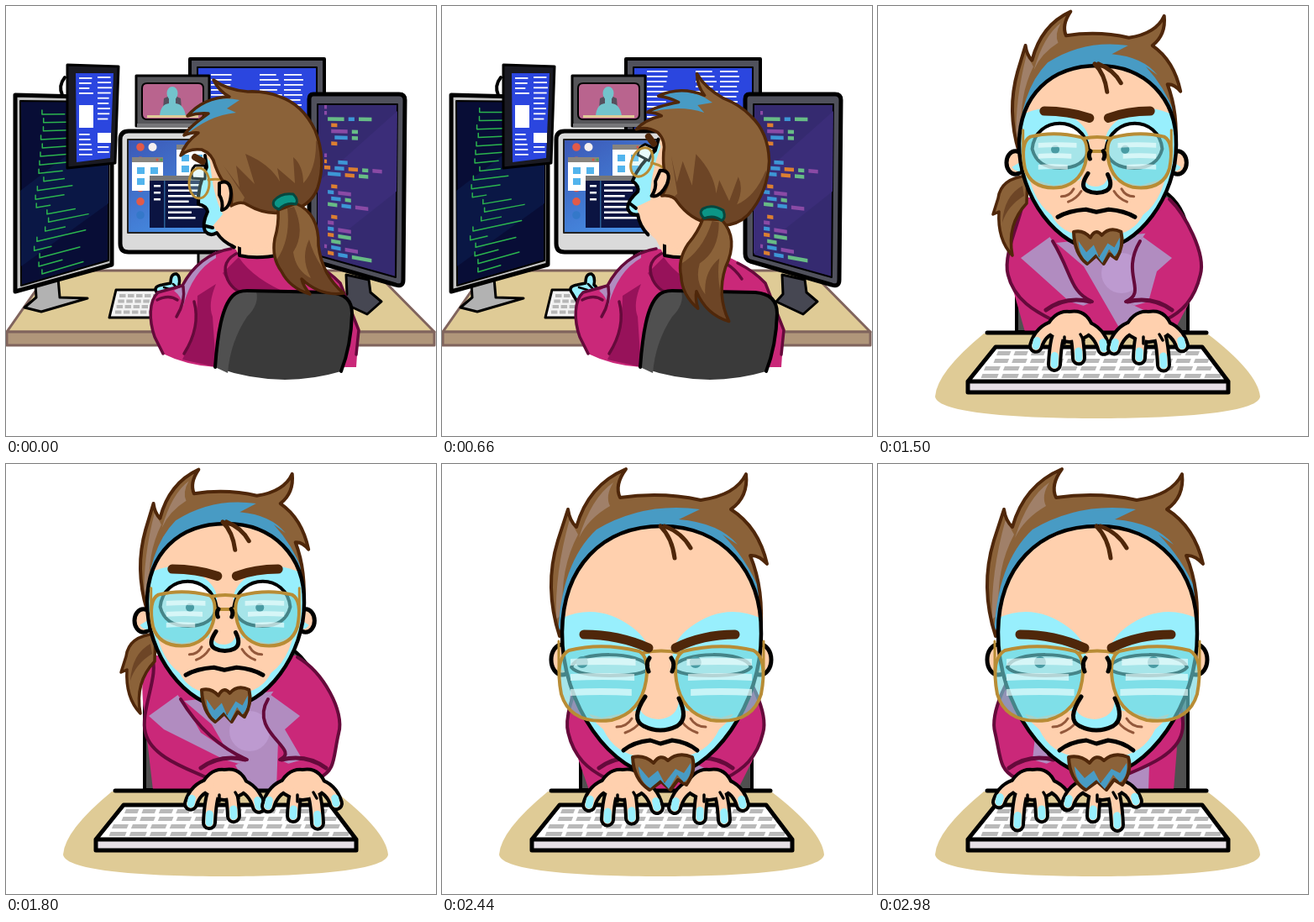
These frames come from a looping animation (512 by 512 pixels, 3 s). An HTML page with a canvas:

```html
<!DOCTYPE html>
<html lang="en">
<head>
<meta charset="utf-8">
<title>At the desk</title>
<style>
html, body { margin: 0; width: 100%; height: 100%; overflow: hidden; background: #fff; }
canvas { display: block; width: 100vw; height: 100vh; }
</style>
</head>
<body>
<canvas id="stage" width="512" height="512"></canvas>
<script>
const LOOP = 3000, CUT = 1500;
const ctx = document.getElementById('stage').getContext('2d');
ctx.lineJoin = ctx.lineCap = 'round';

const C = {
  ink: '#000', skin: '#ffd0ae', glow: '#98effd', hair: '#8b6239', hairDark: '#6d4526',
  hairLine: '#4f270a', blue: '#489bc4', pink: '#ca2879', pinkDark: '#97125a',
  pinkLine: '#650a3b', lilac: '#b18cc0', chair: '#3a3a3a', chairLit: '#505050',
  gold: '#b88c35', desk: '#dfcb96', silver: '#c4c4c4', steel: '#50515c', doc: '#2b46df'
};

// ---- helpers ----
let M = new DOMMatrix();
function shape(d) {
  const p = new Path2D();
  p.addPath(new Path2D(d), M);
  return p;
}
function put(d, fill, line, w = 4) {
  const p = shape(d);
  if (fill) { ctx.fillStyle = fill; ctx.fill(p); }
  if (line) { ctx.strokeStyle = line; ctx.lineWidth = w; ctx.stroke(p); }
}
function within(m, draw) {
  const old = M;
  M = old.multiply(m);
  draw();
  M = old;
}
function clip(d, draw) {
  ctx.save();
  ctx.clip(shape(d));
  draw();
  ctx.restore();
}
const shift = (x, y = 0) => new DOMMatrix([1, 0, 0, 1, x, y]);
const FLIP = new DOMMatrix([-1, 0, 0, 1, 522, 0]);
function both(draw) { draw(); within(FLIP, draw); }
const box = (x, y, w, h) => `M${x},${y}h${w}v${h}h${-w}z`;
const oval = (x, y, a, b = a) => `M${x - a},${y}a${a},${b} 0 1 0 ${2 * a},0a${a},${b} 0 1 0 ${-2 * a},0z`;
const mod = (a, n) => ((a % n) + n) % n;
const rnd = n => mod(Math.sin(n * 127.1 + 11.7) * 43758.5453, 1);

function track(t, keys) {
  if (t <= keys[0][0]) return keys[0][1];
  for (let i = 1; i < keys.length; i++) {
    const [a, u] = keys[i - 1], [b, v] = keys[i];
    if (t < b) {
      const p = (t - a) / (b - a);
      return u + (v - u) * p * p * (3 - 2 * p);
    }
  }
  return keys[keys.length - 1][1];
}

// ---- first scene: the workplace ----
const CODE = [
  'p', ' ggggg bb gggg', '  oo', '  ppppp gg', '   bbbb gg', '  oo', '', 'p', 'o   bbb',
  'oo bbb ooo gg ppp', ' bbbb ooo ggg', '', '  oo', ' bb pppp', '  bbb gg', ' ggg bbb pppp',
  '', '  oo', ' pp', ' bb pppp', ' oo gggg', '  ggg', 'p bbb pppp', ' oo bbb gggggg', '', 'p'
];
const INK = { p: '#8a4aa5', g: '#67bb86', b: '#3d96d6', o: '#dc7f31' };

function greenCode(t) {
  for (let i = 0; i < 20; i++) {
    const y = 122 + mod(i * 10.2 - t * .019 + 7, 204);
    const slope = -.27 * (y - 125) / 180;
    const x = 28 + 18 * rnd(Math.floor(i / 3)) + 8 * rnd(i + 40);
    const w = 12 + 48 * rnd(i + 9);
    const top = y + slope * (x - 30);
    put(`M${x},${top}v-5M${x},${top}l${w},${slope * w}`, null, '#2bb44e', 1.5);
  }
}

function colourCode(t) {
  const up = Math.max(0, t - 660) * 9 / 480;
  CODE.forEach((row, i) => {
    const y = 120 + mod(i * 7.2 + 7 - up, 187);
    const slope = .2 * (y - 125) / 180;
    for (const run of row.matchAll(/(\w)\1*/g)) {
      const x = 379 + run.index * 4.1, w = run[0].length * 4.1 - 1;
      const top = y - 2 + slope * (x - 379);
      put(`M${x},${top}l${w},${slope * w}v4.5l${-w},${-slope * w}z`, INK[run[1]]);
    }
  });
}

function textColumn(x, y, n, w, step, seed) {
  for (let i = 0; i < n; i++) {
    put(box(x, y + i * step, w * (.7 + .3 * rnd(seed + i)), 1.8), '#fff');
  }
}

function monitors(t) {
  // wide screen at the back
  put('M219,63H379V170H219z', C.steel, C.ink, 4);
  put(box(228, 73, 142, 90), C.doc, C.ink, 2);
  clip(box(229, 74, 140, 90), () => {
    const y = 81 - mod(t * .006, 6);
    [244, 302, 331].forEach((x, c) => textColumn(x, y, 14, 27, 6, c * 20));
  });
  // video call
  put(box(155, 83, 87, 60), '#56565a', C.ink, 3);
  put('M168,92H229Q235,92 235,98V129Q235,135 229,135H168Q162,135 162,129V98Q162,92 168,92z', '#b9648e', C.ink, 2);
  put('M187,122L188,110Q198,104 208,110L209,122z', '#55505e');
  put('M183,131Q184,117 194,116L194,108H202V116Q212,117 214,131z', '#73c3cc');
  put(oval(198, 104, 6.5, 8), '#73c3cc');
  put(box(168, 130, 61, 3), C.desk);
  put(box(156, 140, 86, 4), '#77777a');

  // left terminal
  put('M35,331L62,324L64,347L97,348L42,364L22,359L36,347z', '#b2b2b2', C.ink, 3);
  put('M11,106L126,109V308L11,340z', C.silver, C.ink, 5);
  const term = 'M17,113L122,114V303L18,333z';
  put(term, '#080d36', C.ink, 2);
  clip(term, () => {
    put('M17,220L122,140V235L18,310z', '#0a1745');
    greenCode(t);
  });
  // upright document
  put('M70,85Q62,95 67,106', null, C.ink, 4);
  put('M73,70L134,72L130,187L73,193z', '#1a1a22', C.ink, 3);
  put('M83,80L128,80L124,181L84,186z', C.doc);
  textColumn(87, 85, 4, 17, 6, 1);
  textColumn(109, 84, 9, 17, 6.2, 12);
  put(box(87, 118, 17, 27) + box(109, 151, 16, 12), '#fff');
  textColumn(87, 152, 5, 17, 6, 30);
  textColumn(109, 167, 2, 16, 6, 37);

  // main computer
  put('M229,290H262V311H229z', '#bbb', C.ink, 3);
  put('M146,149H270V293H146Q136,293 136,283V159Q136,149 146,149z', '#dadada', C.ink, 5);
  const sky = ctx.createLinearGradient(145, 160, 210, 270);
  sky.addColorStop(0, '#3c58b6');
  sky.addColorStop(1, '#468ee3');
  put(box(145, 159, 125, 111), sky, '#222', 2);
  for (let i = 0; i < 6; i++) put(oval(160, 168 + i * 16.2, 4.8), i % 3 == 2 ? '#3478c9' : '#e25a48');
  put(oval(174.5, 168, 5), '#f5efef');
  for (const [x, y] of [[150, 180], [203, 165]]) {
    put(box(x, y, 37, 40), '#fff');
    put(box(x, y, 37, 6), '#87847f');
    put(oval(x + 30, y + 3, 1.5), '#dd5340');
    put(oval(x + 35, y + 3, 1.5), '#4aa350');
    for (let i = 0; i < 4; i++) put(box(x + 6 + i % 2 * 16, y + 12 + (i >> 1) * 13, 9, 8), '#52b4ed');
  }
  put(box(171, 202, 74, 62), '#0b1442');
  put(box(171, 202, 74, 6), '#777');
  put(box(188, 208, 1.5, 56), '#2b5f95');
  for (let i = 0; i < 7; i++) {
    put(box(193, 212 + i * 6.5, 23 + 20 * rnd(i + Math.floor(t / 400)), 2.5), '#fff');
    if (i < 3) put(box(176, 213 + i * 8, 8, 2.5), '#fff');
  }

  // right editor
  put('M405,320L432,326L434,341L447,352L430,367L398,352L406,343z', '#464752', C.ink, 3);
  put('M366,105H468Q475,105 475,112L473,326Q473,335 464,332L367,304Q361,302 361,295V111Q361,105 366,105z', C.steel, C.ink, 5);
  const edit = 'M371,117H466L464,323L371,297z';
  put(edit, '#352a70', C.ink, 2);
  clip(edit, () => {
    put('M371,210L466,125V220L371,295z', '#3b2d79');
    colourCode(t);
  });
}

function office() {
  put('M52,315H438L510,388H1z', C.desk, '#80645d', 3);
  put('M1,388H510V404H1z', '#b0967a', '#80645d', 3);
}

function deskKeys() {
  put('M131,338H205L200,371H123z', '#f3f3f3', C.ink, 3);
  for (let r = 0; r < 4; r++) for (let c = 0; c < 6; c++) {
    put(box(135 - r * 1.7 + c * 10, 343 + r * 6.5, 7.5, 4), '#b7b7b7');
  }
}

function backBody(t) {
  const reach = track(t, [[0, 0], [600, -12], [1140, -12], [1500, -2]]) + 2 * Math.sin(t / 70);
  within(shift(reach), () => {
    put('M180,342Q174,334 186,332L196,330Q196,318 203,319Q208,322 206,332Q214,338 205,348L186,352z', C.glow, C.ink, 3.5);
    put('M188,335L198,338M199,331L204,336', null, C.ink, 2.5);
  });
  put('M268,289C242,293 222,310 210,333L181,341C170,351 170,374 177,394L187,414Q215,428 250,430H417L420,386L398,330C374,307 350,291 322,296z', C.pink);
  put('M228,345Q228,385 210,421L250,430L246,370Q240,355 250,331z', C.pinkDark);
  put('M250,292Q222,308 211,333L200,339Q209,346 211,357Q222,316 250,300z', C.lilac);
  put('M258,318Q270,340 295,344H340Q295,326 277,299z', C.pinkDark);
  put('M268,289C242,293 222,310 210,333L181,341C170,351 170,374 177,394L187,414M278,293Q254,303 264,326Q272,342 290,343M324,297Q355,302 370,325M211,334Q214,352 203,370M224,352Q232,382 212,414M180,350Q194,343 204,350M417,415L420,386L398,330Q385,316 365,306', null, C.pinkLine, 3.5);
  put('M256,255H326V296Q300,303 278,298z', C.skin);
  put('M278,266V297Q300,302 326,296', null, C.ink, 4);
  // chair
  put('M249,430C252,390 257,358 270,345Q276,339 287,339L386,341Q412,343 412,366Q411,404 399,435Q325,457 249,430z', C.chair);
  put('M249,430C252,390 257,358 270,345Q276,339 298,340Q302,355 287,370Q267,400 264,437z', C.chairLit);
  put('M249,430C252,390 257,358 270,345Q276,339 287,339L386,341Q412,343 412,366Q411,404 399,435', null, C.ink, 4);
}

function backHead() {
  const face = 'M237,164L239,190Q228,215 229,236Q239,238 240,245Q233,260 237,268Q243,275 251,270Q262,284 290,290L326,286L334,220L300,165z';
  put(face, C.skin);
  clip(face, () => put('M220,160L243,185Q246,225 258,248L246,262L257,276L225,285z', C.glow));
  put('M237,178L239,192Q228,215 229,236Q239,238 240,245Q233,260 237,268Q243,275 251,270Q258,281 272,287M238,262L246,264', null, C.ink, 4);
  put('M225,190Q219,196 222,205L237,206V190z', '#fff', C.ink, 3);
  put('M225,180L234,185', null, C.hairLine, 8);
  put(oval(230, 211, 12, 18), 'rgba(180,240,240,.3)', C.gold, 3);
  put('M241,207Q255,204 278,212', null, C.gold, 3);
  // hair
  const hair = 'M208,178Q218,169 233,171Q246,176 249,190Q254,203 258,208Q272,211 268,238Q280,231 288,237Q310,250 334,245Q362,240 371,217Q382,183 368,148Q353,117 326,108Q309,101 288,102Q263,100 247,88Q253,101 266,108Q235,109 216,131Q228,127 241,128Q218,144 212,154Q222,150 229,151Q213,163 208,178z';
  put(hair, C.hair);
  clip(hair, () => {
    put('M259,190L278,216L274,190L296,212L285,176Q314,188 326,209L323,193L344,211L342,180Q354,190 354,211Q370,194 369,160L390,190V250H274L284,228z', C.hairDark);
    put('M214,132Q243,104 278,112L263,122L274,127Q241,130 210,157L229,136z', C.blue);
  });
  put(hair, null, C.hairLine, 3.5);
  put('M254,211Q267,205 268,223Q267,241 257,243Q259,233 254,225z', C.skin, C.ink, 4);
  // ponytail
  const tail = 'M324,243Q325,261 320,277Q316,300 328,316Q338,336 362,343Q354,334 352,325Q374,346 402,342Q376,320 372,285Q373,247 345,235z';
  put(tail, C.hair);
  clip(tail, () => put('M343,239Q357,270 342,293Q345,315 363,324Q350,300 361,278Q369,309 402,342L352,348L315,311Q340,285 335,241z', C.hairDark));
  put(tail, null, C.hairLine, 3.5);
  put('M319,232Q327,222 342,224Q349,231 345,236Q334,233 325,242Q316,239 319,232z', '#0c9686', '#06483f', 3);
}

function workplace(t) {
  office();
  monitors(t);
  deskKeys();
  const dx = track(t, [[0, 0], [600, -13], [1140, -13], [1500, -4]]);
  within(shift(dx), () => backBody(t));
  const x = track(t, [[0, 260], [700, 260], [1100, 251], [1500, 256]]);
  const y = track(t, [[0, 224], [520, 210], [760, 210], [1080, 224]]);
  const turn = track(t, [[0, 0], [580, 24], [760, 24], [1100, -5], [1500, 0]]);
  within(shift(x, y).rotate(turn).translate(-260, -224), backHead);
}

// ---- second scene: close-up ----
// maps box b to the blend of boxes a and b
function fit(a, b, k) {
  const c = a.map((v, i) => v + (b[i] - v) * k);
  const sx = (c[2] - c[0]) / (b[2] - b[0]), sy = (c[3] - c[1]) / (b[3] - b[1]);
  return new DOMMatrix([sx, 0, 0, sy, c[0] - b[0] * sx, c[1] - b[1] * sy]);
}

function keyboard() {
  put('M126,390Q70,436 68,465C70,485 170,491 260,491C350,491 453,485 455,465Q452,436 392,390z', C.desk);
  put('M140,406H386L417,447H107z', '#fff');
  for (let r = 0; r < 4; r++) {
    const left = 141 - r * 7.5, w = (386 + r * 7.5 - left) / 12;
    for (let c = 0; c < 12; c++) {
      const x = left + c * w + (r % 2) * 4;
      put(`M${x + 2},${411 + r * 9}h${w - 5}l-2,5h${5 - w}z`, '#b9b9b9');
    }
  }
  put('M107,447H417V460H107z', '#e7e0e7');
  put('M140,406H386L417,447V460H107V447zM107,447H417', null, C.ink, 5);
}

function torso(lx, rx) {
  const le = lx * .35 + 73, re = rx * .4 + 257;
  put('M165,388V290Q170,208 260,204Q360,200 369,270V388z', C.chairLit, C.ink, 4);
  put(`M175,228C155,238 ${le},290 ${le + 3},320L175,388H352L${re - 8},340Q${re - 10},250 345,228z`, C.pink);
  put('M212,282L245,310L290,388H322L326,270z', C.lilac);
  put(oval(290, 318, 24), '#bd9ad0');
  const arm = (e, h, s) => {
    const outer = `M${260 - s * 87},230C${e + s * 20},248 ${e - s * 5},295 ${e + s * 2},320C${e + s * 9},350 ${h - s * 40},364 ${h - s * 20},374`;
    const inner = `L${h + s * 27},352C${h},340 ${260 - s * 28},320 ${260 - s * 52},280`;
    put(`${outer}${inner}z`, C.pink);
    clip(`${outer}${inner}z`, () =>
      put(`M${260 - s * 54},274L${260 - s * 90},300L${260 - s * 72},316L${h},352L${h + s * 35},362L${260 - s * 28},320z`, C.lilac));
    put(`${outer}M${h + s * 27},352${inner}`, null, C.pinkLine, 4);
    put(`M${h - s * 28},362Q${h - s * 5},345 ${h + s * 25},352`, null, C.pinkLine, 5);
  };
  arm(le, lx, 1);
  arm(re, rx, -1);
}

function hand(x, t, s) {
  const digits = [[-40, 17, -18, 382], [-18, 42, -12, 390], [11, 40, 7, 390], [41, 20, 18, 382]].map(([a, b, c, y], i) => ({
    x: x + s * a, y: 384 + b + 5 * Math.sin(t / 48 + i * 2.1 + s), rx: x + s * c, ry: y
  }));
  const at = (p, u, v) => `${p.rx + (p.x - p.rx) * u},${p.ry + (p.y - p.ry) * v}`;
  const line = (p, c, w) => put(`M${at(p, 0, 0)}Q${at(p, .75, .2)} ${at(p, 1, 1)}`, null, c, w);
  const palm = `M${x - 27},386Q${x - 17},364 ${x},366Q${x + 20},362 ${x + 27},386Q${x},410 ${x - 27},386z`;
  put(palm, C.skin, C.ink, 8);
  digits.forEach(p => line(p, C.ink, 18));
  put(palm, C.skin);
  digits.forEach(p => line(p, C.skin, 10));
  digits.forEach(p => put(`M${at(p, 1, 1)}L${at(p, .94, .72)}`, null, C.glow, 9));
  put(`M${x - 6},394v8M${x + 13},391l4,7`, null, C.ink, 3.5);
}

const HAIR = 'M140,205C128,168 126,130 138,91L150,54Q152,68 160,75Q174,25 219,6Q205,25 212,40Q262,33 308,43Q350,37 362,12Q365,39 344,54Q377,75 387,119Q377,108 367,109Q384,150 379,204Q350,120 262,115Q165,120 140,205z';
const FACE = 'M143,200C144,123 190,74 262,74C333,74 381,126 380,202C381,285 322,370 262,372C202,370 142,286 143,200z';

function eyes(t, lift, k) {
  const top = 222 - lift * 1.5, low = 252 + lift * .9;
  both(() => put(`M154,242C160,${top} 238,${top} 247,243Q240,${low} 200,${low}Q162,${low} 154,242z`, '#fff', C.ink, 4));
  const px = track(t, [[1500, 192], [1800, 203], [2120, 221], [2180, 221], [2400, 165], [2500, 170], [2980, 193]]);
  const py = 243 - 7 * k - lift * k * .2, gap = 115 + 20 * k;
  put(oval(px, py, 7) + oval(px + gap, py, 7), '#0a3c46');
  const beat = Math.floor(t / 130), wide = t > 2300;
  both(() => {
    const lens = 'M151,222Q190,212 235,223Q247,230 243,258Q237,296 202,305Q153,311 142,274Q134,231 151,222z';
    put(lens, 'rgba(112,214,220,.62)');
    clip(lens, () => {
      for (let i = 0; i < 3; i++) {
        const w = wide ? 72 + 9 * rnd(beat + i) : 50 - i * 8 + 18 * rnd(beat + i);
        put(`M${wide ? 153 : 164},${232 + i * 18}q${w / 2},-2 ${w},0v8q${-w / 2},-2 ${-w},0z`, 'rgba(240,255,255,.65)');
      }
    });
    put(lens, null, C.gold, 4);
    put('M139,246V211', null, C.gold, 3);
  });
  put('M246,246H276M239,225Q261,220 283,225', null, C.gold, 4);
}

function closeHead(t, k) {
  const lift = track(t, [[2160, 24], [2380, 0]]);
  const part = (a, b, draw) => within(fit(a, b, k), draw);
  const faceBoxes = [[168, 71, 355, 290], [143, 74, 380, 372]];
  const eyeBoxes = [[172, 152, 350, 218], [138, 217, 384, 308]];

  part([160, 5, 361, 174], [130, 4, 388, 205], () => {
    put(HAIR, C.hair);
    clip(HAIR, () => {
      put('M136,185Q134,130 152,66L162,84Q140,125 144,178zM163,88Q178,40 204,22Q194,38 200,50Q174,65 163,88z', '#a08069');
      put('M138,205Q141,118 184,78Q240,45 307,54L282,66Q330,70 352,96L334,84Q362,112 378,150V215z', C.blue);
    });
    put(HAIR, null, C.hairLine, 4);
  });
  part([153, 172, 369, 201], [130, 214, 394, 252], () => both(() => {
    put(oval(143, 233, 13, 18), C.skin, C.ink, 5);
    put('M138,240Q143,248 150,246V232z', C.glow);
  }));
  part(...faceBoxes, () => {
    put(FACE, C.skin);
    // screen light: around the eyes and along the jaw
    ctx.save();
    ctx.clip(shape(FACE));
    both(() => put('M135,200L152,215Q158,290 192,316Q206,346 240,349L262,374L245,392L125,340z', C.glow));
  });
  part(...eyeBoxes, () => both(() =>
    put('M130,190Q180,160 226,194Q253,214 246,240L234,293Q209,298 190,302L150,290L130,270z', C.glow)));
  ctx.restore();
  part(...faceBoxes, () => put(FACE, null, C.ink, 4.5));
  part([258, 68, 291, 104], [260, 73, 298, 114], () =>
    put('M260,74Q274,88 277,112M265,74Q286,82 296,100', null, C.hairLine, 5));
  part([220, 215, 303, 235], [210, 300, 312, 322], () => both(() =>
    put('M208,313Q220,313 226,303M218,320Q230,316 237,306', null, '#93583b', 3)));
  part(...eyeBoxes, () => eyes(t, lift, k));
  within(shift(0, 2 - lift * k * .8), () => part([195, 120, 327, 134], [165, 195, 353, 222], () => {
    const tilt = lift * k * .3;
    put(`M169,${201 + tilt * .2}Q210,201 246,${217 + tilt}M278,${217 + tilt}Q310,201 349,${201 + tilt * .2}`, null, C.hairLine, 11);
  }));
  part([243, 175, 277, 222], [230, 235, 288, 316], () => {
    put('M247,240Q248,270 236,284Q224,304 240,312Q260,322 280,312Q296,302 282,281Q274,270 274,240z', C.skin);
    put('M235,290Q229,305 240,312Q260,322 280,312Q293,302 282,281Q281,302 258,304Q239,303 235,290z', C.glow);
    put('M242,277Q224,304 240,312Q260,322 280,312Q294,303 282,279M246,247Q242,238 247,231M274,247Q278,238 273,231', null, C.ink, 5);
  });
  part([213, 240, 307, 252], [215, 326, 305, 342], () =>
    put('M216,341Q228,331 248,329L260,333L274,329Q292,331 304,341', null, C.ink, 5));
  part([233, 265, 291, 307], [227, 345, 300, 388], () => {
    put('M227,349Q241,346 252,356Q260,344 269,353Q281,342 298,349Q303,365 291,382L281,376L272,388L261,378L247,388Q228,376 227,349z', C.hair, C.hairLine, 4);
    put('M234,360L246,374L257,365L265,380L278,363L288,368L296,356Q298,372 288,379L280,370L270,387L260,376L248,386Q235,378 234,360z', C.blue);
  });
}

function closeUp(t) {
  const k = track(t, [[1820, 0], [2030, 1.03], [2110, 1]]);
  const lx = track(t, [[1500, 228], [1800, 260], [2120, 212], [2440, 215], [2700, 235], [2980, 184]]);
  const rx = track(t, [[1500, 322], [1800, 353], [2120, 331], [2440, 318], [2700, 330], [2980, 267]]);
  keyboard();
  // anything behind the desk edge
  clip('M0,0H512V390H0z', () => {
    const sway = track(t, [[1800, 0], [2120, -8], [2350, 35]]);
    torso(lx, rx);
    within(shift(sway, k * 35), () => {
      put('M178,202Q146,205 143,229L137,248L144,245Q142,278 160,297Q153,260 177,235z', C.hair, C.hairLine, 3.5);
      put('M172,214Q150,226 148,258Q154,238 174,226z', C.hairDark);
    });
  });
  put('M130,389H391', null, C.ink, 5);
  hand(lx, t, 1);
  hand(rx, t + 90, -1);
  closeHead(t, k);
}

// ---- loop ----
const start = performance.now();
function frame() {
  const t = (performance.now() - start) % LOOP;
  ctx.fillStyle = '#fff';
  ctx.fillRect(0, 0, 512, 512);
  if (t < CUT) workplace(t); else closeUp(t);
  requestAnimationFrame(frame);
}
frame();
</script>
</body>
</html>
```
